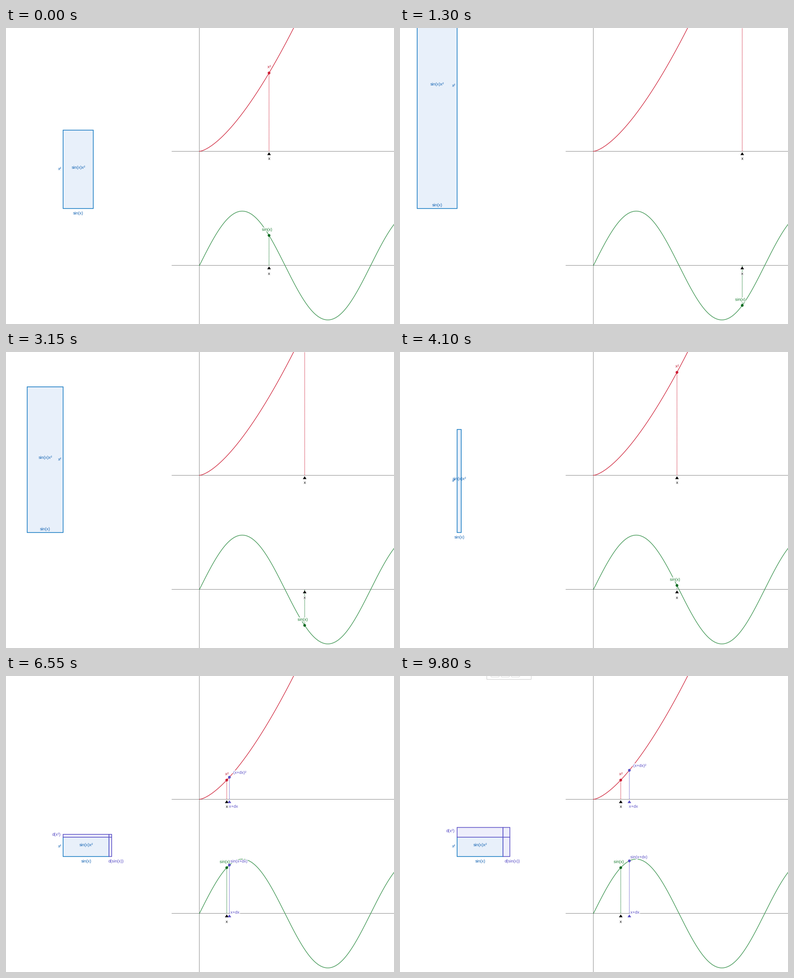
Animation of 856x654 px, one loop 9850 ms. Source, as a matplotlib script:

```python
import numpy as np
import matplotlib
import matplotlib.pyplot as plt
import matplotlib.patheffects as pe
from matplotlib.animation import FuncAnimation
from matplotlib.patches import Circle, FancyBboxPatch, Polygon, Rectangle

W, H, DPI = 856, 654, 64
PT = 72 / DPI  # points per pixel
STEP, FRAMES = 50, 197

ORIGIN_X, UNIT = 426.7, 60.13
TOP_Y, LOW_Y = 272.5, 524.8
BOX_X, BOX_Y = 126, 398.8

RED, DARK_RED = "#cf1f36", "#c0142c"
GREEN, DARK_GREEN = "#157a2c", "#0d6b22"
BLUE, EDGE_BLUE, FILL_BLUE = "#1565b4", "#1579c2", "#e8f0fa"
PURPLE, FILL_PURPLE = "#5a4fc6", "#eeeefb"

# Pointer position and increment, as (ms, units)
X_KEYS = np.array([(0, 2.555), (500, 3.6), (1000, 4.72), (1300, 5.46),
                   (1650, 5.75), (2250, 5.285), (3000, 4.165), (3150, 3.862),
                   (4000, 3.21), (4500, 2.2), (5000, 1.2), (5200, 1.003)])
DX_KEYS = np.array([(6000, 0.02), (6800, 0.13), (7600, 0.216), (8700, 0.316)])
DX_START, PANEL_START = 6050, 9700


def glide(keys, t):
    """Smooth interpolation that never overshoots the keys."""
    ts, vs = keys.T
    if t <= ts[0]:
        return vs[0]
    if t >= ts[-1]:
        return vs[-1]
    slope = np.diff(vs) / np.diff(ts)
    a, b = slope[:-1], slope[1:]
    inner = np.where(a * b > 0, 2 * a * b / (a + b), 0)
    m = np.concatenate([[slope[0]], inner, [0]])
    i = np.searchsorted(ts, t, side="right") - 1
    h = ts[i + 1] - ts[i]
    s = (t - ts[i]) / h
    return ((2*s**3 - 3*s**2 + 1) * vs[i] + (s**3 - 2*s**2 + s) * h * m[i]
            + (3*s**2 - 2*s**3) * vs[i + 1] + (s**3 - s**2) * h * m[i + 1])


def power(u):
    return 42.4 * u ** 1.5


def wave(u):
    return 120.2 * np.sin(u)


matplotlib.rcParams["toolbar"] = "None"
matplotlib.rcParams["path.snap"] = False
fig = plt.figure(figsize=(W / DPI, H / DPI), dpi=DPI, facecolor="white")
ax = fig.add_axes([0, 0, 1, 1])
ax.set_xlim(0, W)
ax.set_ylim(H, 0)
ax.axis("off")

u = np.linspace(0, 7.3, 500)
for xs, ys in (([366, W], [272.5] * 2), ([366, W], [524.5] * 2),
               ([426.5] * 2, [0, H])):
    ax.plot(xs, ys, color="#8c8c8c", lw=PT, zorder=1)
ax.plot(ORIGIN_X + UNIT * u, TOP_Y - power(u), color="#d0283e",
        lw=1.3 * PT, zorder=2)
ax.plot(ORIGIN_X + UNIT * u, LOW_Y - wave(u), color="#479a5a",
        lw=1.4 * PT, zorder=2)

moving = []
HALO = [pe.withStroke(linewidth=3 * PT, foreground="white")]


def label(x, y, text, color, ha="center", halo=True):
    moving.append(ax.text(x, y, text, color=color, ha=ha, va="baseline",
                          family="Liberation Sans", size=9.2 * PT, zorder=6,
                          path_effects=HALO if halo else None,
                          clip_on=True))


def shape(patch, zorder):
    patch.set_zorder(zorder)
    moving.append(ax.add_patch(patch))


def box(x0, y0, x1, y1, edge, fill, zorder):
    shape(Rectangle((min(x0, x1), min(y0, y1)), abs(x1 - x0), abs(y1 - y0),
                    fc=fill, ec=edge, lw=1.5 * PT), zorder)


def probe(x, axis_y, value, color, dot, pointer):
    """Dotted drop line, curve point and pointer below the axis."""
    y = axis_y - value
    moving.extend(ax.plot([x, x], [y, axis_y], color=color, lw=1.4 * PT,
                          ls=(0, (1.1, 1.1)), zorder=3))
    shape(Circle((x, y), 3, fc=dot, ec="none"), 7)
    tip = axis_y + 2
    shape(Polygon([(x, tip), (x - 4, tip + 6.3), (x + 4, tip + 6.3)],
                  fc=pointer, ec="none"), 5)


def draw_x(u):
    x, tall, wide = ORIGIN_X + UNIT * u, power(u), wave(u)
    probe(x, TOP_Y, tall, RED, RED, "black")
    probe(x, LOW_Y, wide, GREEN, DARK_GREEN, "black")
    label(x + 0.4, TOP_Y - tall - 10.7, "x²", DARK_RED)
    label(x - 4.2, LOW_Y - wide - 10.2, "sin(x)", GREEN)
    label(x + 0.4, 291.3, "x", "black")
    label(x, 545.6, "x", "black")

    mid_x, mid_y = BOX_X + wide / 2, BOX_Y - tall / 2
    box(BOX_X, BOX_Y, BOX_X + wide, BOX_Y - tall, EDGE_BLUE, FILL_BLUE, 3)
    label(mid_x + 0.3, mid_y - 1.6, "sin(x)x²", BLUE, halo=False)
    label(119, mid_y + 1.6, "x²", BLUE, halo=False)
    label(mid_x + 0.3, 411.7 if wide >= 0 else 393.7, "sin(x)", BLUE,
          halo=False)


def draw_dx(u, du):
    x = ORIGIN_X + UNIT * (u + du)
    tall, wide = power(u + du), wave(u + du)
    for axis_y, value in ((TOP_Y, tall), (LOW_Y, wide)):
        probe(x, axis_y, value, PURPLE, PURPLE, PURPLE)
    label(x + 8.5, TOP_Y - tall - 7.4, "(x+dx)²", PURPLE, "left")
    label(x + 2.2, LOW_Y - wide - 5.6, "sin(x+dx)", PURPLE, "left")
    label(x - 0.9, 291, "x+dx", PURPLE, "left")
    label(x + 2.4, 525, "x+dx", PURPLE, "left")

    right, top = BOX_X + wave(u), BOX_Y - power(u)
    far, high = BOX_X + wide, BOX_Y - tall
    box(BOX_X, top, right, high, PURPLE, FILL_PURPLE, 4)
    box(right, BOX_Y, far, top, PURPLE, FILL_PURPLE, 4)
    box(right, top, far, high, PURPLE, FILL_PURPLE, 4)
    label(120.3, (top + high) / 2, "d(x²)", PURPLE, "right", False)
    label((right + far) / 2 - 4.2, 411.7, "d(sin(x))", PURPLE, "left", False)


def draw_panel():
    shape(Rectangle((191.5, -30), 98, 37.5, fc="white", ec="#cccccc",
                    lw=PT), 8)
    for left in (200.5, 223, 245.5):
        shape(FancyBboxPatch((left, -16), 18.5, 18.3, fc="white",
                             ec="#d4d4d4", lw=PT,
                             boxstyle="round,pad=0,rounding_size=2"), 9)


def draw(frame):
    while moving:
        moving.pop().remove()
    t = frame * STEP
    u = glide(X_KEYS, t)
    draw_x(u)
    if t >= DX_START:
        draw_dx(u, glide(DX_KEYS, t))
    if t >= PANEL_START:
        draw_panel()
    return moving


anim = FuncAnimation(fig, draw, frames=FRAMES, interval=STEP, repeat=True,
                     repeat_delay=0, blit=False)
plt.show()
```
